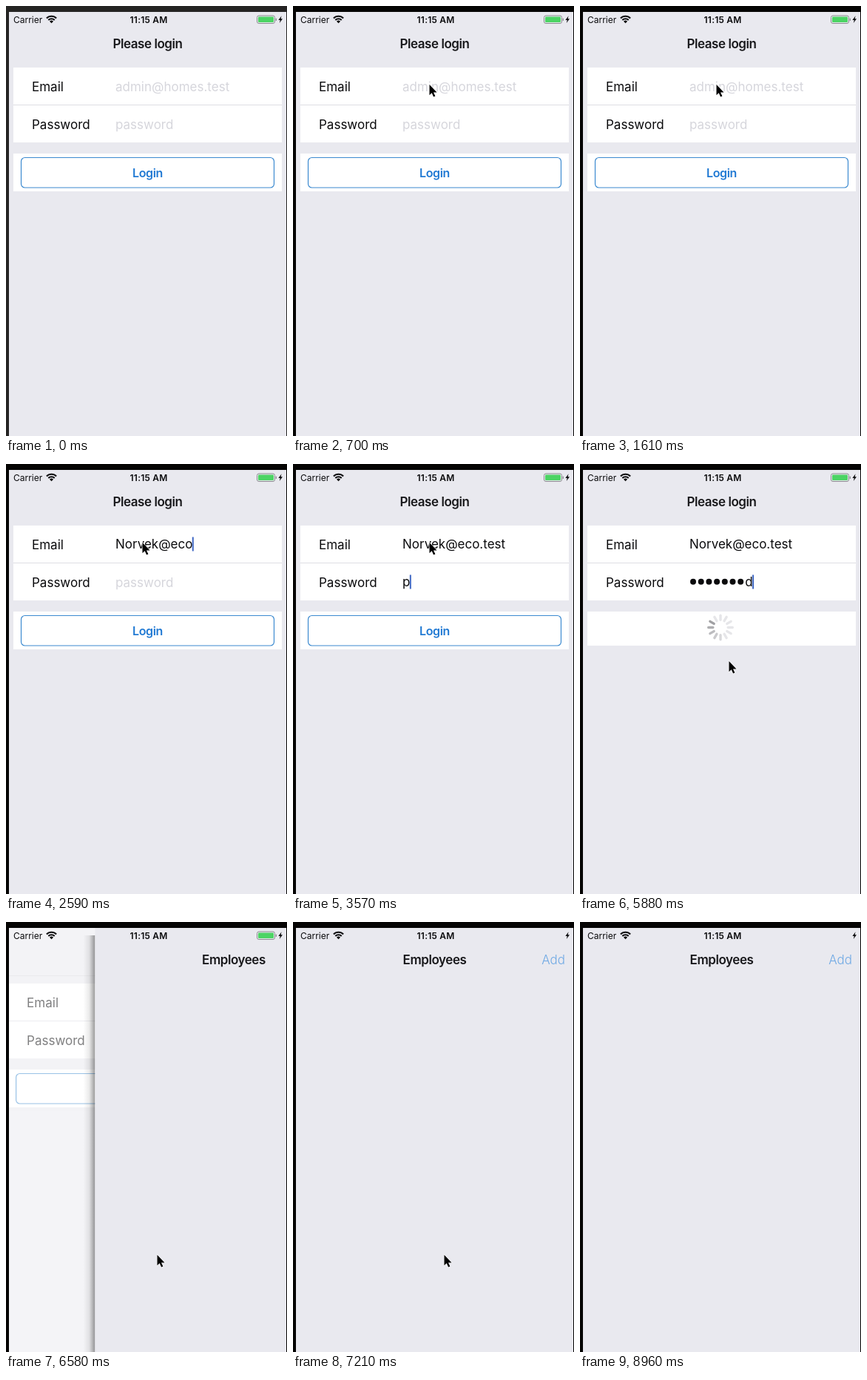
Recreate the animation shown at these times as an HTML page. Size 380 by 580 pixels, loop 9030 ms.

```html
<!DOCTYPE html>
<html lang="en">
<head>
<meta charset="utf-8">
<title>Login flow</title>
<style>
  html, body { margin: 0; width: 100%; height: 100%; overflow: hidden; background: #e9e9ef; }
  svg { display: block; width: 380px; height: 580px; }
  text { font: 400 17px Inter, Roboto, sans-serif; fill: #0b0b0d; white-space: pre; }
  .title { font-weight: 600; letter-spacing: -.45px; text-anchor: middle; fill: #18181b; }
  .status { font-size: 12px; }
  .clock { font-weight: 600; letter-spacing: .2px; text-anchor: middle; }
  .hint { fill: #d6d6dc; }
  .login { font-size: 16px; font-weight: 600; letter-spacing: -.4px; text-anchor: middle; fill: #2079d3; }
  .add { font-weight: 300; text-anchor: end; fill: #3d8fe0; }
  .page { fill: #e9e9ef; }
</style>
</head>
<body>
<svg viewBox="0 0 380 580">
  <defs>
    <linearGradient id="shade">
      <stop offset="0" stop-color="#000" stop-opacity="0"/>
      <stop offset=".5" stop-color="#000" stop-opacity=".08"/>
      <stop offset="1" stop-color="#000" stop-opacity=".4"/>
    </linearGradient>
  </defs>
  <rect width="380" height="580" fill="#fff"/>

  <g id="form">
    <rect class="page" x="4" y="8" width="390" height="572"/>
    <path id="rule" d="M4 72.5H394" stroke="#d8d8de"/>
    <text class="title" x="191.5" y="56.5">Please login</text>
    <rect x="10" y="83" width="363" height="101" fill="#fff"/>
    <path d="M10 133.5H373" stroke="#dedee3"/>
    <text x="35" y="115">Email</text>
    <text x="35" y="166">Password</text>
    <text id="mailHint" class="hint" x="148" y="114.5">admin@homes.test</text>
    <text id="passHint" class="hint" x="148" y="165.5">password</text>
    <text id="mail" x="148" y="114"></text>
    <g id="dots"></g>
    <text id="lastKey" y="165"></text>
    <rect id="caret" width="2" height="19" fill="#4068c4"/>
    <rect id="panel" x="10" y="199" width="363" height="51" fill="#fff"/>
    <g id="button">
      <rect x="20.5" y="204.5" width="342" height="40.5" rx="5" fill="#fff" stroke="#3c8ad0" stroke-width="1.2"/>
      <text id="loginText" class="login" x="191.5" y="231">Login</text>
    </g>
    <g id="spinner" transform="translate(190 220.5)"></g>
  </g>

  <g id="list">
    <rect x="-12" y="18" width="16" height="562" fill="url(#shade)"/>
    <rect class="page" x="4" y="8" width="376" height="572"/>
    <text class="title" x="191.5" y="56.5">Employees</text>
    <text id="add" class="add" x="368" y="56.5">Add</text>
  </g>

  <text class="status" x="10" y="22.5">Carrier</text>
  <g fill="none" stroke="#0b0b0d" stroke-width="2.1">
    <path d="M54.9 16.6A9.2 9.2 0 0 1 68.1 16.6"/>
    <path d="M57.3 19A5.9 5.9 0 0 1 65.7 19"/>
  </g>
  <path d="M61.5 23.3L59 20.7A3.5 3.5 0 0 1 64 20.7Z"/>
  <text class="status clock" x="193" y="22.5">11:15 AM</text>
  <g id="battery">
    <rect x="339.5" y="13" width="24" height="10.5" rx="2.5" fill="none" stroke="#8c8c90"/>
    <rect x="341" y="14.5" width="21" height="7.5" rx="1.2" fill="#4cd464"/>
    <rect x="364.7" y="16.5" width="1.3" height="3.6" rx=".6" fill="#8c8c90"/>
  </g>
  <path d="M372.6 13.2L368.4 18.9H370.8L369.8 23L374 17.2H371.6Z" fill="#0b0b0d"/>

  <path id="bezel" d="M0 0H380V8H4V580H0ZM379 8H380V580H379Z"/>
  <path id="pointer" d="M0 0V14.2L3.2 11.2L5.6 16.6L7.9 15.6L5.5 10.4H10Z" fill="#000"
    stroke="#fff" stroke-width="1.1" paint-order="stroke"/>
</svg>
<script>
  const LOOP = 9030, STEP = 70;
  const ADDRESS = 'Norvek@eco.test', SECRET = 'password';
  const mailKeys = [1680, 1820, 1960, 2030, 2170, 2240, 2380, 2450, 2520, 2590, 2660, 2870, 2940, 3080, 3150];
  const passKeys = [3570, 3710, 3780, 3990, 4130, 4200, 4340, 4620];
  const FOCUS = 980, NEXT_FIELD = 3290, PRESS = 5460, LOADING = 5530, LOADED = 6440;
  const PUSH = 6465, PUSH_TIME = 500, BATTERY_OFF = 6720;
  // time, x, y
  const route = [
    [140, 205, 585], [490, 190, 130], [630, 184.5, 106], [5110, 184.5, 106],
    [5390, 198, 222], [5740, 200, 228], [5880, 201.5, 266], [5950, 203, 421],
    [6090, 204.5, 449], [7490, 204.5, 449], [8190, 210, 600]
  ];

  const $ = id => document.getElementById(id);
  const show = (id, on) => { $(id).style.display = on ? '' : 'none'; };
  const move = (id, x, y) => $(id).setAttribute('transform', `translate(${x} ${y})`);
  const clamp = v => Math.min(1, Math.max(0, v));
  const typed = (keys, t) => keys.filter(k => k <= t).length;

  function add(parent, tag, attrs) {
    const el = document.createElementNS('http://www.w3.org/2000/svg', tag);
    for (const k in attrs) el.setAttribute(k, attrs[k]);
    return parent.appendChild(el);
  }

  const dots = [...SECRET].map((c, i) =>
    add($('dots'), 'circle', { cx: 153 + 10.7 * i, cy: 158.8, r: 4, fill: '#0b0b0d' }));
  const bars = Array.from({ length: 12 }, (_, i) =>
    add($('spinner'), 'rect', { x: -1.7, y: -18, width: 3.4, height: 9.5, rx: 1.7, transform: `rotate(${i * 30})` }));

  function ease(x) {
    const bez = (s, a, b) => 3 * s * (1 - s) ** 2 * a + 3 * s * s * (1 - s) * b + s ** 3;
    if (x <= 0 || x >= 1) return clamp(x);
    let lo = 0, hi = 1;
    for (let i = 0; i < 24; i++) {
      const mid = (lo + hi) / 2;
      if (bez(mid, .2833, .31833) < x) lo = mid; else hi = mid;
    }
    return bez(lo, .99, .99);
  }

  function drawPointer(t) {
    const i = route.findIndex(p => p[0] > t);
    show('pointer', i > 0);
    if (i < 1) return;
    const [t0, x0, y0] = route[i - 1], [t1, x1, y1] = route[i];
    const k = (t - t0) / (t1 - t0);
    move('pointer', x0 + (x1 - x0) * k, y0 + (y1 - y0) * k);
  }

  function drawFields(t) {
    const m = typed(mailKeys, t), p = typed(passKeys, t);
    $('mail').textContent = ADDRESS.slice(0, m);
    $('lastKey').textContent = p ? SECRET[p - 1] : '';
    const keyX = 148 + 10.75 * Math.max(0, p - 1);
    $('lastKey').setAttribute('x', keyX);
    dots.forEach((d, i) => { d.style.display = i < p - 1 ? '' : 'none'; });
    show('mailHint', !m);
    show('passHint', !p);

    const inPass = t >= NEXT_FIELD;
    const x = inPass
      ? keyX + (p ? $('lastKey').getComputedTextLength() - .6 : 0)
      : 148 + (m ? $('mail').getComputedTextLength() - .6 : 0);
    $('caret').setAttribute('x', x);
    $('caret').setAttribute('y', inPass ? 149.5 : 98.5);
    const waiting = t < mailKeys[0] && (t - FOCUS) % 1000 >= 500;
    show('caret', t >= FOCUS && t < LOADED && !waiting);
  }

  function drawButton(t) {
    const busy = t >= LOADING && t < LOADED;
    show('button', !busy);
    show('spinner', busy);
    $('panel').setAttribute('height', busy ? 46 : 51);
    $('loginText').style.opacity = t >= PRESS && t < LOADING ? .2 : 1;
    const lead = Math.floor((t - LOADING) / (1000 / 12)) + 6;
    bars.forEach((b, i) => {
      const age = ((lead - i) % 12 + 12) % 12;
      const g = Math.min(230, 160 + age * 14);
      b.setAttribute('fill', `rgb(${g},${g},${g + 3})`);
    });
  }

  function drawPush(t) {
    const p = ease((t - PUSH) / PUSH_TIME);
    move('form', -10 * p, 0);
    $('form').style.opacity = 1 - .7 * p;
    show('rule', p > 0);
    show('list', p > 0);
    move('list', 375 * (1 - p), 0);
    $('add').style.opacity = .7 * p;
  }

  function draw(time) {
    const t = Math.floor(time % LOOP / STEP) * STEP;
    $('bezel').setAttribute('fill', t < STEP ? '#252423' : '#050403');
    show('battery', t < BATTERY_OFF);
    drawFields(t);
    drawButton(t);
    drawPush(t);
    drawPointer(t);
  }

  const start = performance.now();
  function tick() {
    draw(performance.now() - start);
    requestAnimationFrame(tick);
  }
  tick();
</script>
</body>
</html>
```
